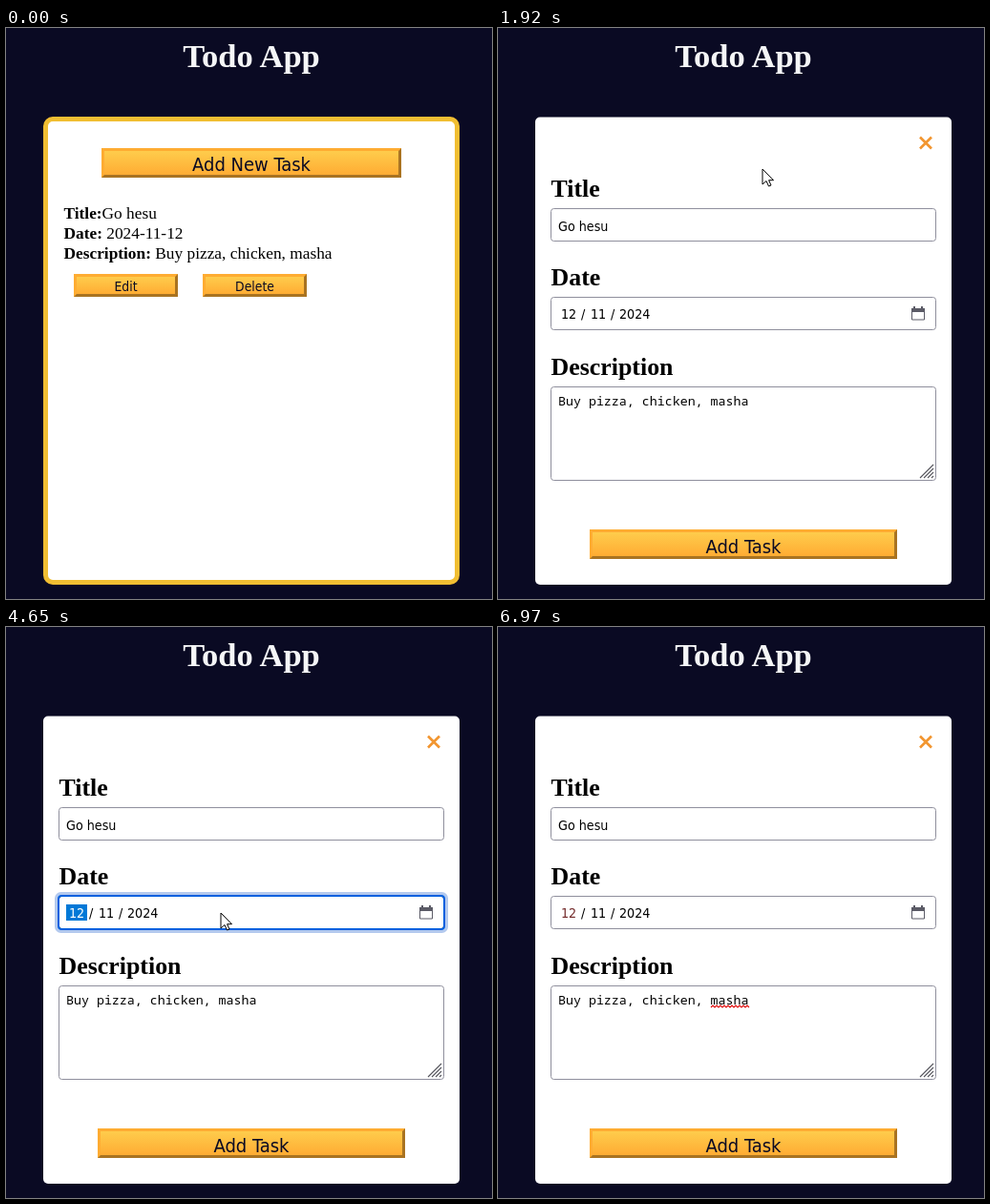
These frames come from a looping animation (509 px wide and 599 px high, 7030 ms). An HTML page:

```html
<!DOCTYPE html>
<html lang="en">
<head>
<meta charset="utf-8">
<title>Todo App</title>
<style>
  html, body { margin: 0; width: 100%; height: 100%; overflow: hidden; background: #0a0a23; }
  svg { display: block; }
  text { white-space: pre; }
  .serif { font-family: "Liberation Serif", "Times New Roman", serif; }
  .sans { font-family: "DejaVu Sans Condensed", "Noto Sans", sans-serif; }
  .mono { font-family: "Noto Sans Mono", "DejaVu Sans Mono", monospace; font-size: 13.3px; }
  .bold { font-weight: bold; }
  .row { font-size: 17.33px; }
  .label { font-size: 25.9px; font-weight: bold; }
  .field { fill: #fff; stroke: #8f8f9d; }
  .field.hover { stroke: #676774; }
</style>
</head>
<body>
<svg id="stage" width="509" height="599" viewBox="0 0 509 599" xmlns="http://www.w3.org/2000/svg">
  <defs>
    <linearGradient id="plain" x2="0" y2="1"><stop stop-color="#fecc4c"/><stop offset="1" stop-color="#ffac33"/></linearGradient>
    <linearGradient id="lit" x2="0" y2="1"><stop stop-color="#ffcc4c"/><stop offset="1" stop-color="#f89808"/></linearGradient>
  </defs>
  <rect width="509" height="599" fill="#0a0a23"/>
  <text class="serif bold" x="257" y="41" font-size="34.5" text-anchor="middle" fill="#f5f6f7">Todo App</text>
  <g id="list"></g>
  <g id="form"></g>
  <g id="pointer" stroke="#000" fill="#fff">
    <path id="arrow" d="M0 0V16L4 12.5L6.5 18L9 17L6.6 11.7H11.5Z"/>
    <g id="hand">
      <path d="M0 15V1.8Q0 0 1.8 0T3.6 1.8V8Q7 7 7.6 9Q10 8 11 10Q12.5 9.5 12 12V16Q12 19 10 23H1Q0 20 -3 17L-5 13Q-5 11 -3 11.5Q-1.5 12.5 0 15Z"/>
      <path d="M3.6 8V12M7.6 9V12" fill="none"/>
    </g>
    <path id="beam" d="M-3 -7.5H3M.5 -7.5V7.5M-3 7.5H3" fill="none"/>
  </g>
</svg>
<script>
const LOOP = 7030, START = 780, STEP = 66.56;
const OPEN = 1520, TITLE_CLICK = 3250, DATE_CLICK = 4250, NOTE_CLICK = 5230;
const NOTE_BLUR = 6970, LEAVE = 5772;
const NOTE = "Buy pizza, chicken, masha";
const TASK = "Go hesu";

// Pointer hotspot over time: [ms, x, y]
const path = [
  [780, 195, 560], [850, 180, 505], [980, 110, 370], [1080, 72, 285], [1150, 76, 262],
  [1230, 95, 236], [1310, 155, 182], [1378, 252, 148], [1512, 252, 148], [1700, 262, 156],
  [1910, 277, 148], [2445, 277, 148], [2700, 215, 215], [2900, 120, 241], [3000, 108, 238],
  [3175, 129, 214], [3380, 129, 214], [3580, 170, 255], [3775, 205, 280], [3910, 205, 285],
  [4200, 214, 292], [4510, 222, 296], [4640, 225, 300], [4850, 280, 360], [5100, 322, 420],
  [5240, 330, 428], [5372, 331, 431], [5439, 335, 451], [5572, 347, 508], [5639, 364, 551],
  [5705, 382, 584]
];

// Hit areas: [x, y, width, height]
const areas = {
  add: [100, 126, 314, 31], edit: [71, 258, 109, 24], del: [206, 258, 109, 24],
  rows: [61, 186, 282, 60], title: [55, 189, 404, 35], date: [55, 282, 404, 35],
  note: [55, 376, 404, 99], save: [96, 526, 322, 31]
};
const listAreas = ["add", "edit", "del", "rows"];
const formAreas = ["title", "date", "note", "save"];
const buttons = ["add", "edit", "del", "save"];
const fields = ["title", "date", "note"];
const beamAreas = ["rows", "title", "note"];

const $ = id => document.getElementById(id);
const text = (cls, x, y, str, extra = "") => `<text class="${cls}" x="${x}" y="${y}" ${extra}>${str}</text>`;
const row = (y, name, value) =>
  text("serif row", 60.5, y, `<tspan class="bold">${name}</tspan>${value}`);

function button(id, label, size, baseline) {
  const [x, y, w, h] = areas[id];
  return `<rect x="${x}" y="${y}" width="${w}" height="${h}" fill="#feac32"/>
    <path d="M${x} ${y + h}l3 -3h${w - 6}v${6 - h}l3 -3v${h}z" fill="#a97321"/>
    <rect id="${id}" x="${x + 3}" y="${y + 3}" width="${w - 6}" height="${h - 6}"/>` +
    text("sans", x + w / 2, baseline, label, `font-size="${size}" text-anchor="middle" fill="#0a0a23"`);
}

function field(id) {
  const [x, y, w, h] = areas[id];
  return `<rect id="${id}" class="field" x="${x + .5}" y="${y + .5}" width="${w - 1}" height="${h - 1}" rx="3"/>
    <g id="${id}Ring" fill="none">
      <rect x="${x - 2.5}" y="${y - 2.5}" width="${w + 5}" height="${h + 5}" rx="5" stroke="#b3c9ee" stroke-width="3"/>
      <rect x="${x}" y="${y}" width="${w}" height="${h}" rx="3" stroke="#0060df" stroke-width="2"/>
    </g>`;
}

const caret = (id, x, y, h) => `<path id="${id}" d="M${x} ${y}v${h}" stroke="#000"/>`;
const fieldText = (x, y, str, extra) => text("sans", x, y, str, 'font-size="14.2" ' + (extra || ""));
const grip = [0, 4, 8, 12].map(d => `M${442 + d} 472L456 ${458 + d}`).join("");
const wave = "M223 399" + "l2 -2l2 2".repeat(10);

$("list").innerHTML =
  `<rect x="41.5" y="95.5" width="431" height="486" rx="7.5" fill="#fff" stroke="#f1be32" stroke-width="5"/>` +
  button("add", "Add New Task", 20, 150) +
  row(200, "Title:", TASK) + row(221, "Date:", " 2024-11-12") + row(242, "Description:", " " + NOTE) +
  button("edit", "Edit", 13.8, 276) + button("del", "Delete", 13.8, 276);

$("form").innerHTML =
  `<rect x="39" y="93.5" width="436" height="490.5" rx="5" fill="#fff"/>
  <path d="M442 114.5l12 12m0 -12l-12 12" stroke="#f2952f" stroke-width="2.6"/>` +
  text("serif label", 55.5, 177, "Title") + field("title") + fieldText(63, 213, TASK) +
  caret("titleCaret", 118.5, 199, 17) +
  text("serif label", 55.5, 270, "Date") + field("date") +
  `<rect id="picked" x="63" y="291" width="22" height="17" fill="#0078d7"/>` +
  fieldText(66, 305, "12", 'id="month"') + fieldText(87, 305, "/") + fieldText(97, 305, "11") +
  fieldText(118, 305, "/") + fieldText(127, 305, "2024") +
  `<path d="M433.5 295.5h13v10.5h-13z" fill="none" stroke="#5b5b66"/>
  <path d="M433 294h14v4h-14zM435 292h2v3h-2zM443 292h2v3h-2z" fill="#5b5b66"/>` +
  text("serif label", 55.5, 364, "Description") + field("note") + text("mono", 63, 396, NOTE) +
  `<path id="spell" d="${wave}" fill="none" stroke="#e00000" stroke-width="1.1"/>` +
  caret("noteCaret", 263.5, 383, 17) +
  `<path d="${grip}" stroke="#55555c" stroke-width="1.1"/>` +
  button("save", "Add Task", 20, 551);

const show = (id, on) => $(id).setAttribute("visibility", on ? "inherit" : "hidden");
const between = (t, a, b) => t >= a && t < b;

function pointerAt(t) {
  const s = START + Math.floor((t - START) / STEP + .001) * STEP;
  const i = path.findIndex(p => p[0] > s);
  if (i === 0) return path[0].slice(1);
  if (i < 0) return path[path.length - 1].slice(1);
  const [t0, x0, y0] = path[i - 1], [t1, x1, y1] = path[i];
  const k = (s - t0) / (t1 - t0);
  return [x0 + (x1 - x0) * k, y0 + (y1 - y0) * k].map(Math.round);
}

function draw(t) {
  const open = t >= OPEN;
  const present = between(t, START, LEAVE);
  const [px, py] = pointerAt(t);
  const over = present && (open ? formAreas : listAreas).find(id => {
    const [x, y, w, h] = areas[id];
    return px >= x && px < x + w && py >= y && py < y + h;
  });
  const shape = buttons.includes(over) ? "hand" : beamAreas.includes(over) ? "beam" : "arrow";

  show("list", !open);
  show("form", open);
  show("pointer", present);
  $("pointer").setAttribute("transform", `translate(${px} ${py})`);
  for (const id of ["arrow", "hand", "beam"]) show(id, id === shape);
  for (const id of buttons) $(id).setAttribute("fill", `url(#${id === over ? "lit" : "plain"})`);
  for (const id of fields) $(id).classList.toggle("hover", id === over);

  const inDate = between(t, DATE_CLICK, NOTE_CLICK);
  show("titleRing", between(t, TITLE_CLICK, DATE_CLICK));
  show("dateRing", inDate);
  show("noteRing", between(t, NOTE_CLICK, NOTE_BLUR));
  show("picked", inDate);
  $("month").setAttribute("fill", inDate ? "#fff" : t >= NOTE_CLICK ? "#742c2c" : "#000");
  show("titleCaret", between(t, TITLE_CLICK, 3775));
  show("noteCaret", between(t, NOTE_CLICK, 5770) || between(t, 6230, 6770));
  show("spell", t >= NOTE_CLICK);
}

const begin = performance.now();
function tick() {
  draw((performance.now() - begin) % LOOP);
  requestAnimationFrame(tick);
}
tick();
</script>
</body>
</html>
```
